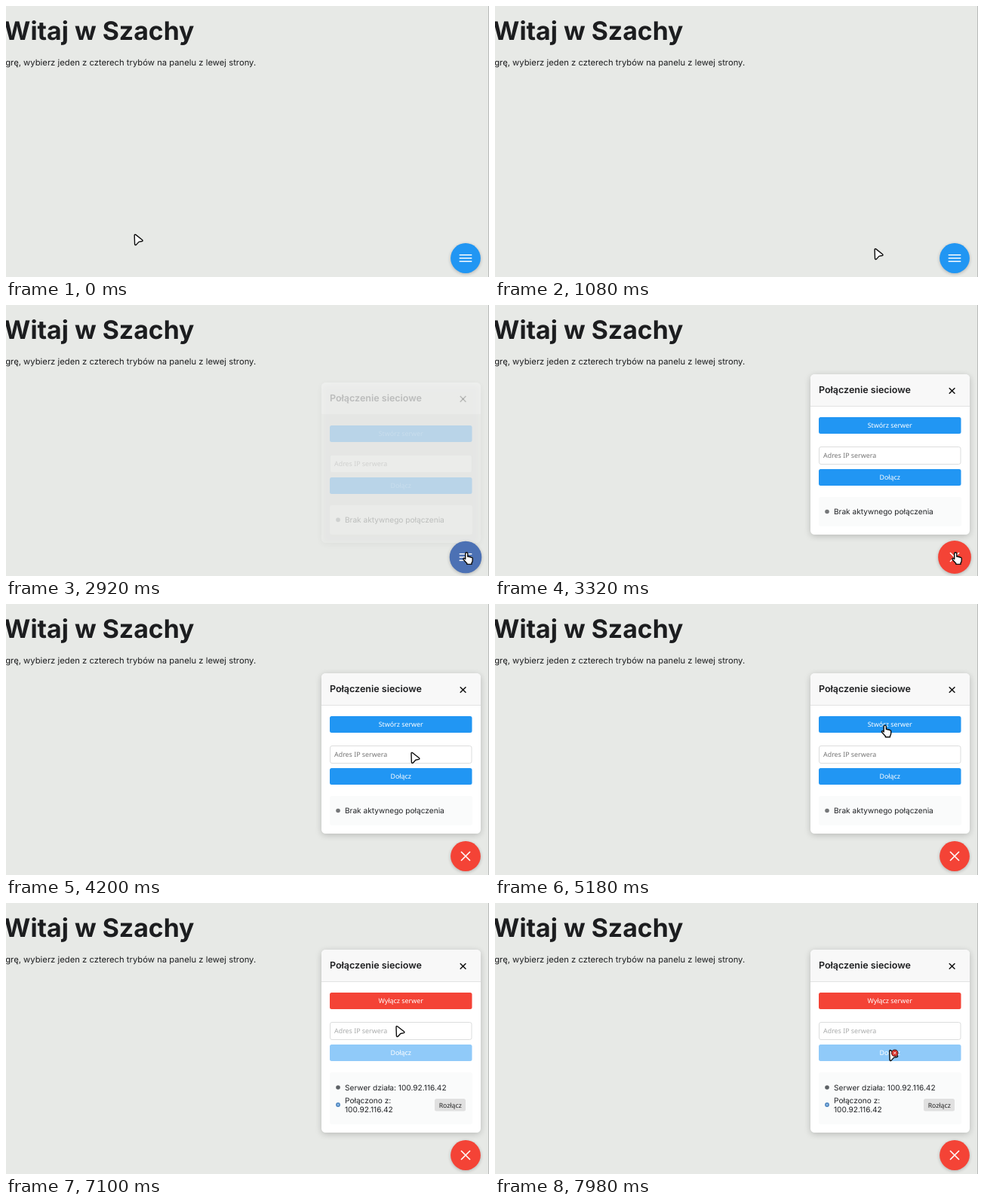
These frames come from a looping animation (640x360 px, 8000 ms). An HTML page with a canvas:

```html
<!DOCTYPE html>
<html lang="pl">
<head>
<meta charset="utf-8">
<title>Szachy</title>
<style>
html, body { margin: 0; width: 100%; height: 100%; overflow: hidden; background: #e7e9e6; }
canvas { display: block; width: 640px; height: 360px; }
</style>
</head>
<body>
<canvas id="stage" width="640" height="360"></canvas>
<script>
const ctx = document.getElementById('stage').getContext('2d');
ctx.textRendering = 'geometricPrecision';

const LOOP = 8000;
const OPEN = 2860, SERVER = 5520, JOIN = 7000;
const INTER = 'Inter, sans-serif';
const NOTO = '"Noto Sans", sans-serif';
const BLUE = [33, 150, 243], DARK_BLUE = [28, 126, 216], RED = [244, 67, 54];

// Pointer hotspot: time, x, y
const PATH = [
  [0, 170, 303.5], [150, 170, 303.5], [1000, 502.9, 322.5], [1200, 502.9, 322.5],
  [1800, 610.2, 329], [3500, 610.2, 329], [4500, 516.7, 161.3], [5200, 516.7, 161.3],
  [5500, 516.7, 163], [7050, 516.7, 163], [7700, 522.5, 195.5]
];

const clamp = v => Math.max(0, Math.min(1, v));
const ease = v => v * v * (3 - 2 * v);
const ramp = (t, start, length) => ease(clamp((t - start) / length));
const mix = (a, b, k) => a + (b - a) * k;
const rgb = (a, b, k) => `rgb(${a.map((v, i) => Math.round(mix(v, b[i], k))).join()})`;

function pointerAt(t) {
  const i = PATH.findIndex(p => p[0] > t);
  if (i < 0) return PATH[PATH.length - 1].slice(1);
  const a = PATH[i - 1], b = PATH[i];
  const k = ease((t - a[0]) / (b[0] - a[0]));
  return [mix(a[1], b[1], k), mix(a[2], b[2], k)];
}

function text(str, x, y, font, color, align = 'left') {
  ctx.font = font;
  ctx.fillStyle = color;
  ctx.textAlign = align;
  ctx.fillText(str, x, y);
}

function box(x, y, w, h, r, fill, stroke) {
  ctx.beginPath();
  ctx.roundRect(x, y, w, h, r);
  if (fill) {
    ctx.fillStyle = fill;
    ctx.fill();
  }
  if (stroke) {
    ctx.lineWidth = 1;
    ctx.strokeStyle = stroke;
    ctx.stroke();
  }
}

function disc(x, y, r, fill) {
  ctx.beginPath();
  ctx.arc(x, y, r, 0, Math.PI * 2);
  ctx.fillStyle = fill;
  ctx.fill();
}

function line(x1, y1, x2, y2, color, width) {
  ctx.beginPath();
  ctx.moveTo(x1, y1);
  ctx.lineTo(x2, y2);
  ctx.lineWidth = width;
  ctx.strokeStyle = color;
  ctx.stroke();
}

function cross(x, y, r, color, width) {
  line(x - r, y - r, x + r, y + r, color, width);
  line(x - r, y + r, x + r, y - r, color, width);
}

function shadow(alpha, blur, dy) {
  ctx.shadowColor = `rgba(0,0,0,${alpha})`;
  ctx.shadowBlur = blur;
  ctx.shadowOffsetY = dy;
}

function page() {
  ctx.fillStyle = '#e7e9e6';
  ctx.fillRect(0, 0, 640, 360);
  ctx.fillStyle = '#b8bab8';
  ctx.fillRect(639, 0, 1, 360);
  text('Witaj w Szachy', 123.4, 45, `700 33.8px ${INTER}`, '#1c1d1f', 'center');
  text('grę, wybierz jeden z czterech trybów na panelu z lewej strony.',
    165.2, 79, `400 11.25px ${INTER}`, '#1c1d1f', 'center');
}

function button(label, y, fill) {
  box(429, y, 188.5, 22, 2.5, fill);
  text(label, 523.2, y + 14.3, `500 8.9px ${NOTO}`, '#fff', 'center');
}

function status(y, dot, str) {
  disc(440, y, 2.8, dot);
  text(str, 449, y + 3.6, `400 10.15px ${INTER}`, '#212326');
}

function panel(t) {
  const shown = ramp(t, OPEN, 200);
  if (!shown) return;
  const server = t >= SERVER, joined = t >= JOIN;
  const top = joined ? 62 : 92;
  ctx.save();
  ctx.globalAlpha = shown;
  ctx.translate(0, (1 - shown) * 14);

  ctx.save();
  shadow(0.2, 9, 2);
  box(418, top, 211, 305 - top, 5.5, '#fff');
  ctx.restore();
  box(418, top, 211, 42, [5.5, 5.5, 0, 0], '#f8f8f8');
  ctx.fillStyle = '#e2e3e3';
  ctx.fillRect(418, top + 42, 211, 1);
  text('Połączenie sieciowe', 429, top + 25, `600 12.5px ${INTER}`, '#1c1d1f');
  cross(605.6, top + 22, 3.8, '#111', 1.5);

  button(server ? 'Wyłącz serwer' : 'Stwórz serwer', top + 57, server ? '#f44336' : '#2196f3');
  box(429.5, top + 96.5, 187.5, 23, 2.5, '#fff', '#dcdddd');
  text('Adres IP serwera', 435, top + 111.3, `400 8.9px ${NOTO}`, joined ? '#a9abab' : '#757575');
  button('Dołącz', top + 126, joined ? '#90caf9' : '#2196f3');

  box(429, top + 163, 189, 294 - top - 163, 3, '#fafbfb');
  status(top + (joined ? 183 : 182.5), server ? '#5c6064' : '#757779',
    server ? 'Serwer działa: 100.92.116.42' : 'Brak aktywnego połączenia');
  if (joined) {
    status(262.5, 'transparent', 'Połączono z:');
    status(274.5, 'transparent', '100.92.116.42');
    disc(440, 268, 2.9, '#4b83bd');
    disc(440, 268, 1.4, '#8fbce6');
    box(568, 260, 41, 16.5, 2.5, '#e0e0e0');
    text('Rozłącz', 588.7, 271.5, `500 8.7px ${NOTO}`, '#222', 'center');
  }
  ctx.restore();
}

function fab(t) {
  const hover = ramp(t, 1720, 180) - ramp(t, 3580, 180);
  const open = ramp(t, OPEN, 200);
  const base = BLUE.map((v, i) => mix(v, DARK_BLUE[i], hover));
  ctx.save();
  shadow(0.24, 4, 1.2);
  disc(609, 335, 19.9 + hover * mix(1.2, 2, open), rgb(base, RED, open));
  ctx.restore();
  ctx.save();
  ctx.translate(609, 335);
  if (open < 0.5) {
    for (const y of [-4.3, 0, 4.3]) line(-8.3, y, 8.3, y, '#fff', 1.5);
  } else {
    cross(0, 0, 6, '#fff', 1.6);
  }
  ctx.restore();
}

function outline(path) {
  ctx.lineJoin = 'round';
  ctx.lineWidth = 1.4;
  ctx.fillStyle = '#fff';
  ctx.strokeStyle = '#0c0c0c';
  ctx.fill(path);
  ctx.stroke(path);
}

const ARROW = new Path2D('M.2 1.2Q.4 -.6 2 .4L10.6 7.2Q11.8 8.5 10.2 9L6 9.9L2.6 13.6Q.9 14.8 .6 12.9Z');
const HAND = new Path2D('M-1.5 1.2Q-1.4 -.2 0 -.2Q1.5 -.2 1.6 1.2V5.2Q3 4.6 3.9 5.7Q5.3 5.1 6 6.3' +
  'Q7.9 5.9 8 7.8V10.5Q8 12.5 6.8 13.6V15.4H.6V14.2L-4 9.2Q-4.8 7.8 -3.5 7.3Q-2.6 7.1 -1.5 8.6Z');

function pointer(t) {
  const [x, y] = pointerAt(t);
  const onFab = Math.hypot(x - 609, y - 335) < 20.5;
  const top = t >= JOIN ? 62 : 92;
  const over = (from, to) => t >= OPEN && x > 429 && x < 617.5 && y > top + from && y < top + to;
  const blocked = t >= JOIN && over(126, 148);
  const onButton = over(57, 79) || over(126, 148);
  ctx.save();
  ctx.translate(x, y);
  outline(!blocked && (onFab || onButton) ? HAND : ARROW);
  if (blocked) {
    disc(7.2, 3.8, 4.8, '#3a2020');
    disc(7.2, 3.8, 3.9, '#d8332c');
    cross(7.2, 3.8, 1.5, '#fff', 1);
  }
  ctx.restore();
}

function draw(now) {
  const t = now % LOOP;
  page();
  panel(t);
  fab(t);
  pointer(t);
}

function tick() {
  draw(performance.now());
  requestAnimationFrame(tick);
}
tick();
</script>
</body>
</html>
```
